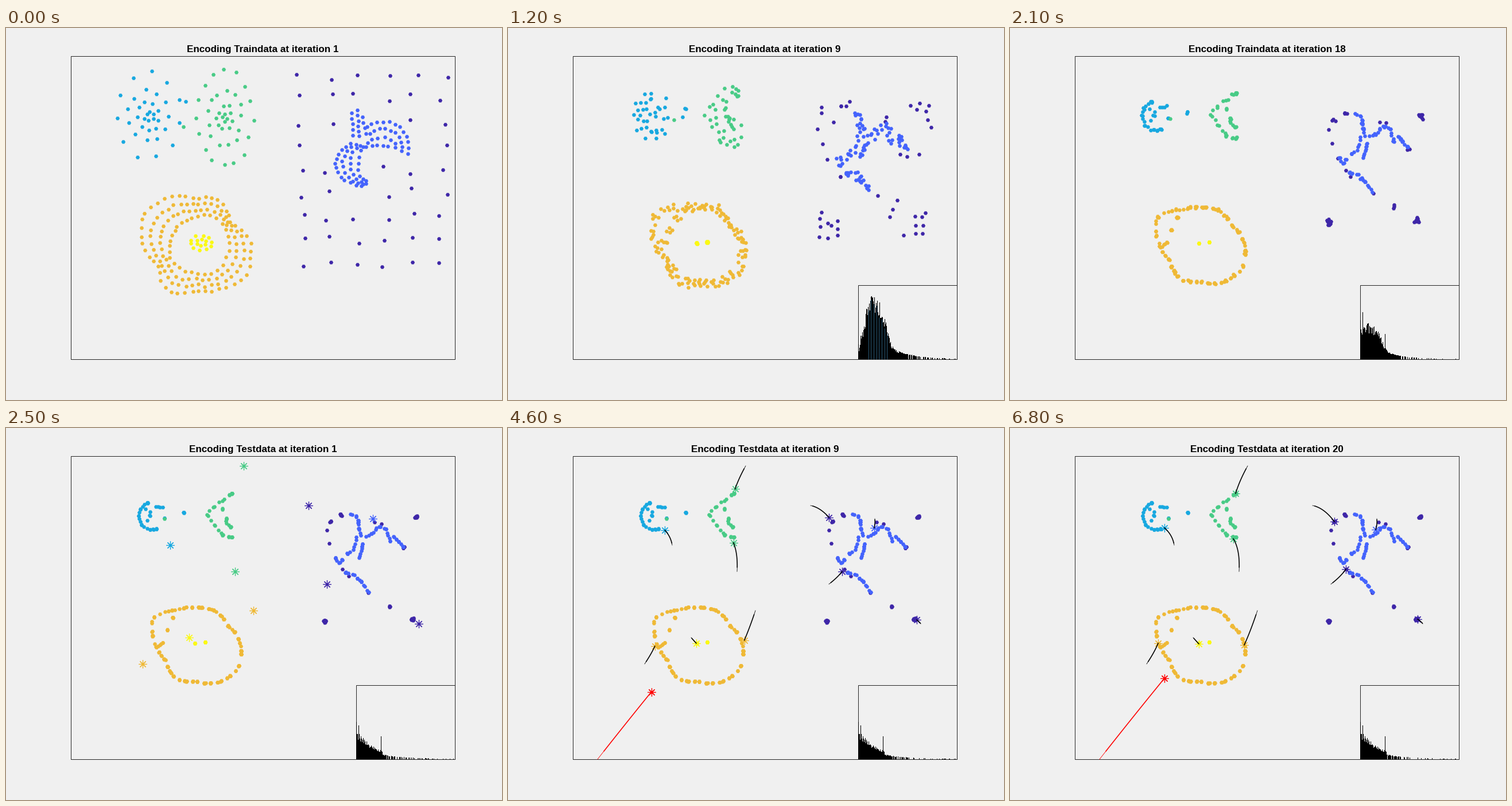
A matplotlib script that plays this animation: 864 by 648 pixels, repeating every 9800 ms.

```python
import numpy as np
import matplotlib.pyplot as plt
from matplotlib.animation import FuncAnimation
from matplotlib.patches import Rectangle

W, H, DPI = 864, 648, 72
STEP, LOOP = 100, 9800
BACK, EDGE = "#f0f0f0", "#262626"
PURPLE, BLUE, CYAN = "#3e26a8", "#4463fc", "#17a8e0"
GREEN, ORANGE, YELLOW = "#48cb86", "#efb936", "#fbf914"
rng = np.random.default_rng(8)


def pts(*values):
    return np.reshape(values, (-1, 2)).astype(float)


def jitter(p, size):
    return p + rng.uniform(-size, size, p.shape)


def arc(cx, cy, rx, ry, a, b, n):
    t = np.radians(np.linspace(a, b, n))
    return np.column_stack([cx + rx * np.cos(t), cy + ry * np.sin(t)])


def ring(cx, cy, rx, ry, n, phase=-90):
    return arc(cx, cy, rx, ry, phase, phase + 360 * (1 - 1 / n), n)


def strand(n, *keys, clumps=0):
    """n dots along a polyline, drawn together into clumps if wanted."""
    p = pts(*keys)
    length = np.append(0, np.cumsum(np.hypot(*np.diff(p, axis=0).T)))
    u = np.linspace(0, 1, n)
    if clumps:
        u = u - 0.8 * np.sin(2 * np.pi * clumps * u) / (2 * np.pi * clumps)
    return np.column_stack([np.interp(u * length[-1], length, p[:, k]) for k in (0, 1)])


# Two loose rosettes
def make_cyan():
    c = 249, 153
    start = [ring(*c, 7, 8, 6), ring(*c, 20, 25, 9, -105), ring(*c, 36, 44, 11, -100),
             ring(*c, 57, 75, 11, -87)]
    end = [arc(254, 153, 23, 24, 70, 250, 14), strand(4, 261, 138, 273, 138),
           strand(4, 244, 141, 254, 147, 246, 161), pts(276, 157, 310, 148)]
    return np.vstack([jitter(np.vstack(start), 3), pts(313, 128)]), np.vstack(end)


def make_green():
    c = 381, 157
    start = [ring(*c, 4, 5, 4), ring(*c, 13, 22, 9, -105), ring(*c, 29, 47, 13, -85),
             ring(*c, 49, 84, 16, -88)]
    end = [strand(18, 393, 114, 371, 130, 349, 148, 366, 174, 380, 189, 393, 190, clumps=6),
           strand(5, 384, 158, 382, 165, 391, 172), pts(377, 141, 277, 159)]
    return np.vstack([jitter(np.vstack(start), 4), pts(309, 172)]), np.vstack(end)


# A bent arm with a knob, inside a loose field
def make_blue():
    start = [strand(5, 602, 147, 605, 187), strand(6, 613, 144, 614, 189),
             strand(4, 621, 156, 627, 184),
             arc(656, 207, 45, 44, -128, 15, 12), arc(656, 207, 34, 31, -130, 15, 10),
             arc(654, 207, 25, 17, -160, 5, 7), strand(5, 628, 207, 646, 204, 665, 206),
             arc(627, 236, 53, 40, 98, 240, 13), arc(627, 236, 41, 37, 95, 245, 11),
             arc(627, 236, 28, 34, 92, 250, 10), arc(627, 236, 14, 30, 88, 250, 8)]
    end = [strand(11, 600, 150, 608, 151, 613, 157, 614, 172, 618, 187, clumps=4),
           strand(14, 627, 189, 642, 181, 647, 170, 662, 176, 669, 197, clumps=6),
           strand(5, 676, 190, 692, 207, clumps=2),
           strand(7, 611, 190, 605, 212, 595, 219, clumps=3),
           strand(7, 621, 202, 615, 227, clumps=3),
           strand(5, 574, 226, 581, 237, 585, 229),
           strand(11, 592, 252, 606, 256, 618, 267, 632, 286, clumps=4)]
    return jitter(np.vstack(start), 1.2), np.vstack(end)


def make_purple(keep_off):
    x, y = np.meshgrid(512 + 50 * np.arange(6), 82 + 41 * np.arange(9))
    field = jitter(np.column_stack([x.ravel(), y.ravel()]), 9)
    gap = np.linalg.norm(field[:, None] - keep_off[None], axis=2).min(axis=1)
    end = pts(583, 151, 565, 163, 559, 176, 562, 200, 573, 227, 585, 246, 598, 257,
              632, 288, 668, 312, 555, 337, 708, 333, 714, 155, 643, 166, 653, 169,
              693, 209)
    return field[gap > 20], end


# A lumpy doughnut given by radii every 30 degrees, and its core
OUTER = [96, 104, 91, 82, 96, 76, 93, 103, 92, 79, 85, 70]
INNER = [60, 60, 61, 51, 52, 51, 46, 43, 44, 46, 56, 60]
SETTLED = [78, 86, 78, 66, 70, 60, 70, 87, 67, 62, 66, 64]


def polar(angle, radii):
    r = np.interp(angle, np.arange(0, 360, 30), radii, period=360)
    t = np.radians(angle)
    return np.column_stack([330 + r * np.cos(t), 375 + r * np.sin(t)])


def make_orange():
    start = []
    for k, n in zip(np.linspace(0, 1, 4), (46, 42, 36, 29)):
        angle = np.arange(n) * 360 / n
        start.append(polar(angle, OUTER) * (1 - k) + polar(angle, INNER) * k)
    clump = np.repeat(np.arange(24) * 15, 3) + rng.uniform(-6, 6, 72)
    end = [polar(clump, SETTLED), strand(4, 265, 380, 273, 374), pts(281, 352, 291, 330)]
    return jitter(np.vstack(start), 1.8), np.vstack(end)


def make_yellow():
    start = [ring(340, 374, 19, 12, 10, -80), ring(340, 374, 9, 5, 6)]
    return jitter(np.vstack(start), 1.5), pts(329, 375, 347, 373)


def pair(start, end):
    """Nearest end for every start, with each end used at least once."""
    dist = np.linalg.norm(start[:, None] - end[None], axis=2)
    pick = dist.argmin(axis=1)
    for j in range(len(end)):
        if j not in pick:
            shared = np.bincount(pick, minlength=len(end))[pick] > 1
            pick[np.where(shared, dist[:, j], np.inf).argmin()] = j
    return end[pick]


class Cloud:
    def __init__(self, ax, color, start, end, spread=0.7, bow=2.2, power=1):
        self.start, self.power = start, power
        self.end = jitter(pair(start, end), spread)
        self.bow = rng.normal(0, bow, start.shape)
        self.dots, = ax.plot([], [], "H", color=color, ms=7.2, mew=0)

    def place(self, left):
        s = left ** self.power
        p = self.end + (self.start - self.end) * s + self.bow * 4 * s * (1 - s)
        self.dots.set_data(p[:, 0], p[:, 1])


class Star:
    """Marker that follows a curve from a start past a bend to its goal."""

    def __init__(self, ax, color, trail, *curve):
        self.curve = pts(*curve)
        self.mark, = ax.plot([], [], marker=(8, 2, 0), ms=14, mew=1.2, color=color, zorder=4)
        self.thin, = ax.plot([], [], color=trail, lw=0.8, zorder=5)
        self.thick, = ax.plot([], [], color=trail, lw=1.6, zorder=5)

    def span(self, lo, hi):
        a, b, c = self.curve
        u = np.linspace(lo, hi, 40)[:, None]
        return (a * (1 - u) ** 2 + 2 * b * u * (1 - u) + c * u ** 2).T

    def place(self, shown, u):
        first = min(u, progress(1))
        x, y = self.span(first, u)
        self.mark.set_data(x[-1:], y[-1:])
        self.thin.set_data(*self.span(0, first))
        self.thick.set_data(x, y)
        self.mark.set_visible(shown)
        for line in (self.thin, self.thick):
            line.set_visible(shown and u > 0)


def progress(n):
    return (1 - 0.9 * 0.82 ** (n - 1)) / (1 - 0.9 * 0.82 ** 19)


def remaining(n):
    last = np.exp(-0.12 * 21)
    return (np.exp(-0.12 * (n - 1)) - last) / (1 - last)


EDGES = np.arange(610, 782)
BASE = 577


def heights(n, test):
    """A hump that drifts left and sinks into a decaying slope with a tail."""
    x = EDGES[:-1]
    stage = 21 if test else n

    def blend(early, middle, late):
        return np.interp(stage, [5, 14, 21], [early, middle, late])

    hump = blend(107, 93, 0) * np.exp(-np.abs((x - blend(641, 632, 626)) / blend(20, 23, 23)) ** 3)
    slope = blend(0, 0, 46) * np.exp(-(x - 610) / 38) * (x < 656)
    tail = blend(35, 14, 7) * np.exp(-(x - 660) / blend(35, 28, 38)) * (x >= 656)
    noise = np.random.default_rng(stage).uniform(0.78, 1.1, x.size)
    h = (hump + slope + tail) * noise
    h += blend(0, 28, 18) * np.isin(x, [610, 614]) + blend(0, 25, 25) * (x == 653)
    luck = np.random.default_rng(50 + n).random(x.size)
    return np.where((h < 9) & (x > 656), np.ceil(h) * (luck < 0.1 + h * 0.11), np.round(h))


fig = plt.figure(figsize=(W / DPI, H / DPI), dpi=DPI, facecolor=BACK)
ax = fig.add_axes([0, 0, 1, 1])
ax.set_xlim(0, W)
ax.set_ylim(H, 0)
ax.axis("off")

ax.add_patch(Rectangle((112.5, 48.5), 669, 528, fill=False, ec=EDGE, lw=1))
title = ax.text(447.5, 41.7, "", ha="center", va="baseline", fontsize=17,
                family="Liberation Sans", weight="bold", color="black")

blue = make_blue()
clouds = [Cloud(ax, PURPLE, *make_purple(blue[0]), spread=2.5),
          Cloud(ax, BLUE, *blue),
          Cloud(ax, CYAN, *make_cyan()),
          Cloud(ax, GREEN, *make_green()),
          Cloud(ax, ORANGE, *make_orange()),
          Cloud(ax, YELLOW, *make_yellow(), spread=0, bow=0, power=2)]

stars = [Star(ax, GREEN, "k", 414, 66, 400, 91, 393, 114),
         Star(ax, GREEN, "k", 399, 250, 401, 212, 389, 193),
         Star(ax, CYAN, "k", 286, 204, 283, 186, 269, 174),
         Star(ax, PURPLE, "k", 527, 135, 547, 139, 565, 163),
         Star(ax, PURPLE, "k", 559, 272, 576, 259, 585, 246),
         Star(ax, PURPLE, "k", 719, 341, 716, 337, 710, 333),
         Star(ax, BLUE, "k", 639, 158, 640, 168, 637, 177),
         Star(ax, ORANGE, "k", 431, 318, 419, 354, 408, 378),
         Star(ax, ORANGE, "k", 238, 411, 252, 390, 258, 375),
         Star(ax, YELLOW, "k", 319, 365, 326, 373, 329, 376)]
probe = Star(ax, "red", "red", 156, 577, 211, 507, 269, 436)

frame = Rectangle((609.5, 447.5), 172, 129, fill=False, ec=EDGE, lw=1)
ax.add_patch(frame)
hist = ax.stairs(np.full(len(EDGES) - 1, BASE), EDGES, baseline=BASE, fill=True,
                 color="black", lw=0)
FACES = np.arange(627.5, 664, 4.7)
faces = ax.vlines(FACES, BASE, BASE, color="#3f86b0", lw=0.7)


def draw(i):
    t = i * STEP
    test, moving = t >= 2500, t >= 3000
    if test:
        n = min(20, 1 + max(0, t - 3000) // 200)
    else:
        n = 1 if t < 500 else 2 + (t - 500) // 100
    title.set_text(f"Encoding {'Test' if test else 'Train'}data at iteration {n}")

    for cloud in clouds:
        cloud.place(0 if test else remaining(n))

    u = progress(n) if moving else 0
    for star in stars:
        star.place(test, u)
    probe.place(moving, u)

    has_hist = test or n > 1
    h = heights(n, test)
    hist.set_data(BASE - h)
    tops = BASE - h[FACES.astype(int) - EDGES[0]] * 0.95
    faces.set_segments([[(x, BASE), (x, y)] for x, y in zip(FACES, tops)])
    for part in (frame, hist):
        part.set_visible(has_hist)
    faces.set_visible(has_hist and not test and n < 10)
    return []


anim = FuncAnimation(fig, draw, frames=LOOP // STEP, interval=STEP,
                     repeat=True, repeat_delay=0)
plt.show()
```
